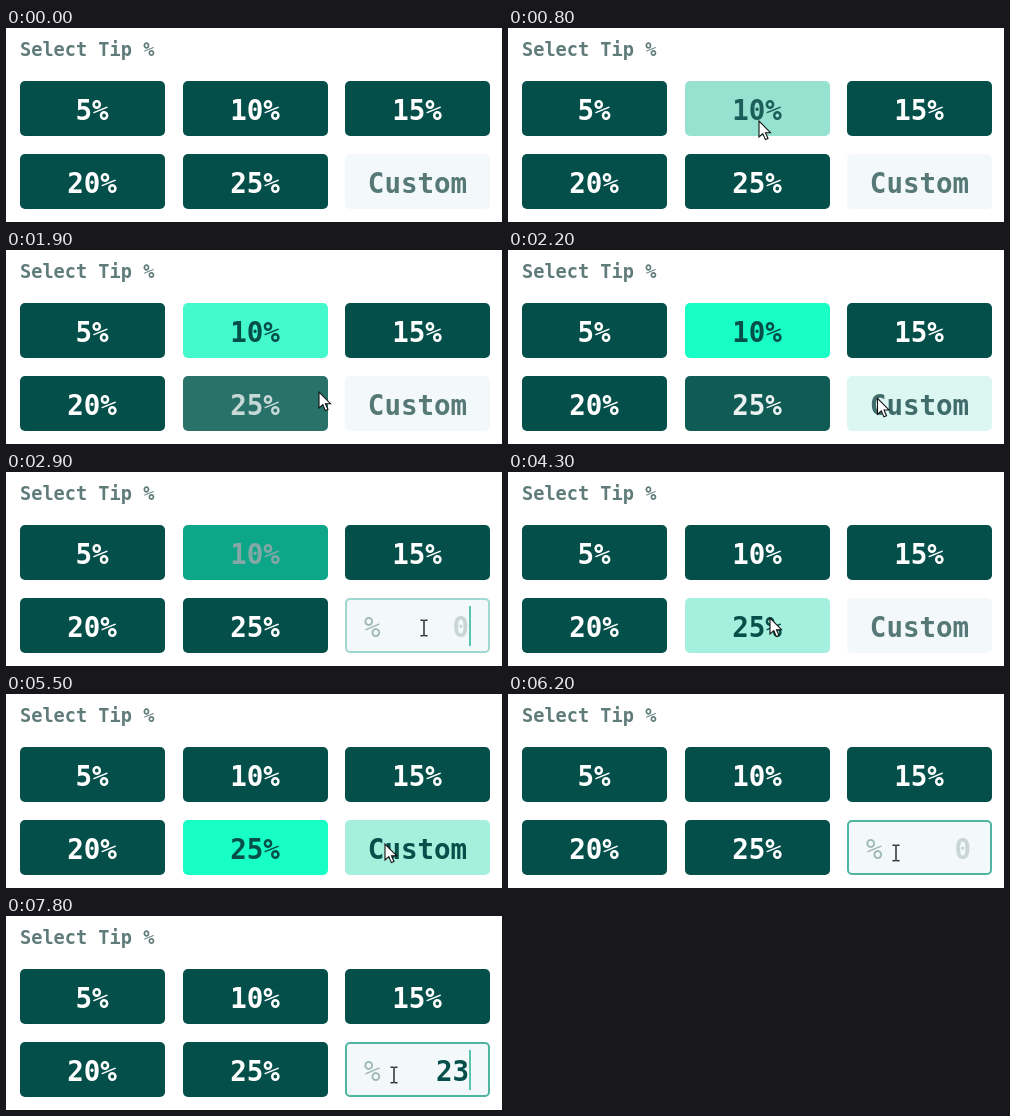
Recreate the animation shown at these times as an HTML page with a canvas. Size 496x194 px, loop 8000 ms.

```html
<!DOCTYPE html>
<html lang="en">
<head>
<meta charset="utf-8">
<title>Tip selector</title>
<style>
  html, body { margin: 0; width: 100%; height: 100%; overflow: hidden; background: #fff; }
  canvas { display: block; width: 496px; height: 194px; }
</style>
</head>
<body>
<canvas id="stage"></canvas>
<script>
const W = 496, H = 194, LOOP = 8000, FADE = 400;
const canvas = document.getElementById('stage');
const ctx = canvas.getContext('2d');
const ratio = window.devicePixelRatio || 1;
canvas.width = W * ratio;
canvas.height = H * ratio;

const DARK = [5, 79, 74], WHITE = [255, 255, 255];
const HOVER = [164, 239, 221], ACTIVE = [24, 255, 198];
const FIELD = [243, 249, 251], MUTED = [86, 120, 119];
const BORDER = [79, 181, 161];
const FONT = '"DejaVu Sans Mono", monospace';
const BUTTON_W = 145, BUTTON_H = 55;

const STYLES = {
  idle: { back: DARK, ink: WHITE },
  hover: { back: HOVER, ink: DARK },
  active: { back: ACTIVE, ink: DARK },
  field: { back: FIELD, ink: MUTED }
};

// Each state entry is [start time, style]; changes cross-fade.
const BUTTONS = [
  { text: '5%', x: 14, y: 53 },
  { text: '10%', x: 177, y: 53, states: [[475, 'hover'], [1650, 'active'], [2700, 'idle'], [3560, 'hover'], [3830, 'idle']] },
  { text: '15%', x: 339, y: 53 },
  { text: '20%', x: 14, y: 126 },
  { text: '25%', x: 177, y: 126, states: [[1780, 'hover'], [1930, 'idle'], [3880, 'hover'], [5030, 'active'], [5700, 'idle']] }
];
const FIELD_STATES = [[2060, 'hover'], [2700, 'field'], [5120, 'hover'], [5700, 'field']];
const FOCUS = [[2700, 4100], [5700, LOOP]];
const KEYS = [[7300, '2'], [7700, '23']];

// Pointer waypoints: time, x, y
const PATH = [
  [300, 290, 20], [750, 251, 93], [1350, 251, 93], [1800, 306, 144],
  [1900, 313, 142], [2450, 412, 153], [2800, 418, 156], [3300, 418, 156],
  [3700, 296, 94], [4150, 262, 146], [4800, 262, 146], [5150, 344, 147],
  [5500, 379, 150], [6100, 388, 159]
];

const clamp = v => Math.max(0, Math.min(1, v));
const ease = v => { v = clamp(v); return v * v * (3 - 2 * v); };
const mix = (a, b, k) => a.map((v, i) => v + (b[i] - v) * k);
const rgb = (c, alpha = 1) => `rgba(${c.map(Math.round).join(',')},${alpha})`;

// A fade stops where the next one takes over.
function styleAt(t, base, states = []) {
  return states.reduce((now, [start, name], i) => {
    const end = i + 1 < states.length ? states[i + 1][0] : Infinity;
    const k = ease((Math.min(t, end) - start) / FADE);
    return {
      back: mix(now.back, STYLES[name].back, k),
      ink: mix(now.ink, STYLES[name].ink, k)
    };
  }, STYLES[base]);
}

function write(text, x, y, size, color, align = 'left', weight = 700) {
  ctx.font = `${weight} ${size}px ${FONT}`;
  ctx.textAlign = align;
  ctx.fillStyle = rgb(color);
  ctx.fillText(text, x, y);
}

function box(x, y, w, h, r) {
  ctx.beginPath();
  ctx.roundRect(x, y, w, h, r);
}

function fillButton(x, y, color) {
  box(x, y, BUTTON_W, BUTTON_H, 5);
  ctx.fillStyle = rgb(color);
  ctx.fill();
}

function drawButton({ text, x, y, states }, t) {
  const style = styleAt(t, 'idle', states);
  fillButton(x, y, style.back);
  write(text, x + 72, y + 38.5, 27.5, style.ink, 'center');
}

function drawField(t, focus) {
  const style = focus ? STYLES.field : styleAt(t, 'field', FIELD_STATES);
  fillButton(339, 126, style.back);

  if (!focus) {
    write('Custom', 411.5, 164.5, 27.5, style.ink, 'center');
    return;
  }
  box(340, 127, BUTTON_W - 2, BUTTON_H - 2, 4);
  ctx.strokeStyle = rgb(BORDER, ease((t - focus[0]) / FADE));
  ctx.lineWidth = 2;
  ctx.stroke();

  const key = KEYS.filter(([at]) => t >= at).pop();
  write('%', 358, 164.5, 27.5, [160, 184, 180], 'left', 400);
  write(key ? key[1] : '0', 463, 164.5, 27.5, key ? DARK : [202, 214, 213], 'right');

  const blinkStart = key ? key[0] : focus[0];
  if ((t - blinkStart) % 1000 < 500) {
    ctx.fillStyle = rgb([88, 196, 174]);
    ctx.fillRect(463, 134, 2, 40);
  }
}

function pointerAt(t) {
  const next = PATH.findIndex(p => p[0] > t);
  if (next === 0) return null;
  if (next < 0) return PATH[PATH.length - 1].slice(1);
  const [t0, ...from] = PATH[next - 1], [t1, ...to] = PATH[next];
  return mix(from, to, ease((t - t0) / (t1 - t0)));
}

function drawArrow(x, y) {
  const points = [[0, 0], [0, 16], [3.8, 12.6], [6.4, 18.6], [9, 17.5], [6.5, 11.7], [11.5, 11.7]];
  ctx.beginPath();
  points.forEach(([dx, dy]) => ctx.lineTo(x + dx, y + dy));
  ctx.closePath();
  ctx.fillStyle = '#fff';
  ctx.fill();
  ctx.strokeStyle = '#111';
  ctx.lineWidth = 1.1;
  ctx.stroke();
}

function drawBeam(x, y) {
  ctx.fillStyle = '#222';
  ctx.fillRect(x - 0.7, y - 8, 1.4, 16);
  for (const edge of [-8.5, 7]) {
    ctx.fillRect(x - 3.5, y + edge, 3, 1.4);
    ctx.fillRect(x + 0.5, y + edge, 3, 1.4);
  }
}

function draw(t) {
  ctx.setTransform(ratio, 0, 0, ratio, 0, 0);
  ctx.fillStyle = '#fff';
  ctx.fillRect(0, 0, W, H);
  write('Select Tip %', 14, 28, 18.6, [96, 124, 122]);

  const focus = FOCUS.find(([on, off]) => t >= on && t < off);
  BUTTONS.forEach(button => drawButton(button, t));
  drawField(t, focus);

  const pointer = pointerAt(t);
  if (!pointer) return;
  const [x, y] = pointer;
  const overField = x >= 339 && y >= 126;
  (focus && overField ? drawBeam : drawArrow)(x, y);
}

function tick() {
  draw(performance.now() % LOOP);
  requestAnimationFrame(tick);
}
tick();
</script>
</body>
</html>
```
